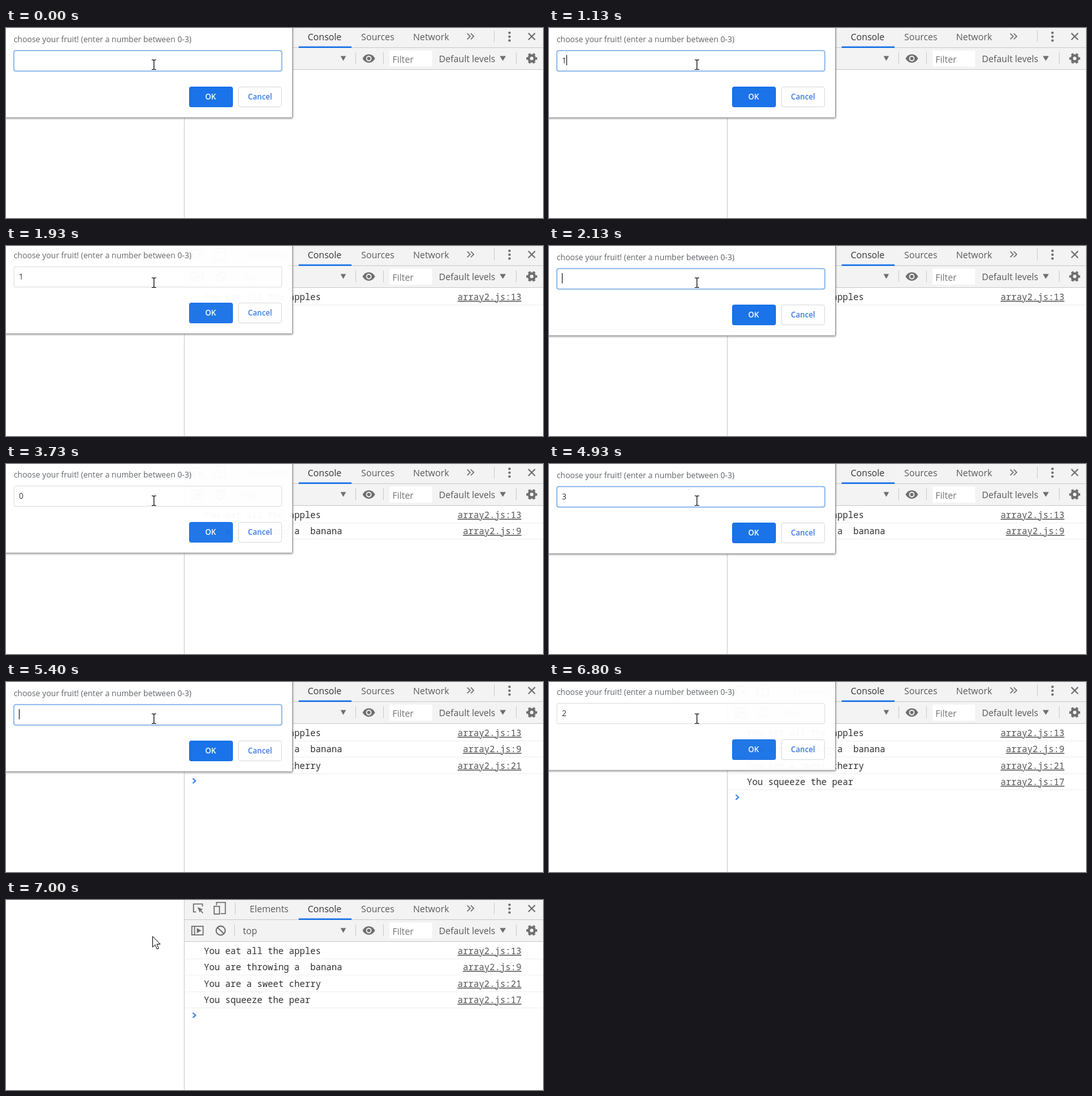
An HTML page for the animation above (8000 ms loop, 833x295 px).

```html
<!DOCTYPE html>
<html lang="en">
<head>
<meta charset="utf-8">
<title>Fruit prompt</title>
<style>
html, body { margin: 0; width: 100%; height: 100%; overflow: hidden; background: #fff; }
svg { display: block; }
text { font-family: "Open Sans", "Noto Sans", sans-serif; white-space: pre; }
.ui { font-size: 14px; fill: #5a5a5a; }
.log, .link { font-family: "Noto Sans Mono", "DejaVu Sans Mono", monospace; font-size: 13.75px; fill: #303030; }
.link { fill: #545454; text-anchor: end; text-decoration: underline; }
.msg { font-size: 12.3px; fill: #5f6368; }
.btn { font-size: 11.7px; font-weight: 600; text-anchor: middle; }
.icon { fill: none; stroke: #6e6e6e; stroke-width: 1.6; }
.solid { fill: #6e6e6e; }
</style>
</head>
<body>
<svg width="833" height="295" viewBox="0 0 833 295">
  <defs>
    <filter id="shade" x="-5%" y="-5%" width="110%" height="115%">
      <feDropShadow dx="0" dy="1" stdDeviation="1.5" flood-color="#000" flood-opacity=".4"/>
    </filter>
  </defs>
  <rect width="833" height="295" fill="#fff"/>

  <!-- developer tools -->
  <rect x="277" width="556" height="64" fill="#f3f3f3"/>
  <path d="M277 30.5H833M277 64.5H833M276.5 0V295" stroke="#ccc"/>
  <path d="M355.5 4V22M757.5 4V22M354.5 38V56M542.5 38V56M585.5 38V56M791.5 38V56" stroke="#ccc"/>
  <rect x="454" y="28.5" width="82" height="2.5" fill="#1a73e8"/>
  <text class="ui" x="378" y="18.5">Elements</text>
  <text class="ui" x="468" y="18.5" style="fill:#333">Console</text>
  <text class="ui" x="551" y="18.5">Sources</text>
  <text class="ui" x="631.5" y="18.5">Network</text>

  <g class="icon">
    <path d="M295 18.5H290.8V6.3H304.7V10"/>
    <path d="M297 11L305.5 14.5L302 16L300.5 19.5Z" class="solid" stroke="none"/>
    <path d="M301.5 16L305.5 20.5"/>
    <path d="M326.5 8V3.8H340.3V21.3H333"/>
    <rect x="322.8" y="9.8" width="8.4" height="12"/>
    <path d="M715.5 8.5L720 13L715.5 17.5M721 8.5L725.5 13L721 17.5"/>
    <path d="M810.3 8L820.7 18.4M820.7 8L810.3 18.4" stroke-width="1.9"/>
    <rect x="288.3" y="40.8" width="17.4" height="13.4"/>
    <path d="M292.5 41V54"/>
    <path d="M296 43.5L303 47.5L296 51.5Z" class="solid" stroke="none"/>
    <circle cx="333" cy="47.5" r="7" stroke-width="1.8"/>
    <path d="M328 42.6L338 52.4" stroke-width="1.8"/>
  </g>
  <g class="solid">
    <circle cx="781" cy="7.4" r="1.9"/><circle cx="781" cy="13.4" r="1.9"/><circle cx="781" cy="19.4" r="1.9"/>
    <path d="M519 43.5H527.4L523.2 51ZM766 43.5H775.4L770.7 51Z"/>
    <path d="M553 47.3Q556.5 40.7 562.8 40.7T572.6 47.3Q569 53.9 562.8 53.9T553 47.3Z"/>
  </g>
  <circle cx="562.8" cy="47.3" r="3.5" fill="#6e6e6e" stroke="#f3f3f3" stroke-width="1.7"/>
  <circle cx="815.5" cy="47.3" r="4.6" fill="none" stroke="#6e6e6e" stroke-width="3.8"/>
  <circle cx="815.5" cy="47.3" r="7.2" fill="none" stroke="#6e6e6e" stroke-width="2.6" pathLength="12" stroke-dasharray="1" stroke-dashoffset=".5"/>
  <text class="ui" x="367.5" y="52.5">top</text>
  <rect x="595" y="35" width="66" height="25" fill="#fff"/>
  <text class="ui" x="599.5" y="53.5" style="fill:#757575">Filter</text>
  <text class="ui" x="671.5" y="52.5">Default levels</text>

  <g id="rows"></g>
  <path id="chevron" d="M289.7 -3.8L294 0L289.7 3.8" fill="none" stroke="#3b7de9" stroke-width="1.9"/>

  <!-- prompt window -->
  <g id="dialog">
    <rect x="-10" y="-40" width="454.5" height="179.2" rx="1" fill="#fff" stroke="#929292" filter="url(#shade)"/>
    <text class="msg" x="12" y="21.5">choose your fruit! (enter a number between 0-3)</text>
    <rect id="box" x="12.2" y="35.2" width="415.6" height="31.6" rx="3" fill="#fff"/>
    <text id="digit" class="msg" x="20" y="55" style="fill:#303134"></text>
    <rect id="caret" y="42" width="1" height="16" fill="#111"/>
    <rect x="284" y="91" width="68" height="32" rx="3.5" fill="#1a73e8"/>
    <text class="btn" x="317.4" y="111" fill="#fff">OK</text>
    <rect x="360.5" y="91.5" width="67" height="31" rx="3.5" fill="#fff" stroke="#dadce0"/>
    <text class="btn" x="394" y="111" fill="#3b78e0">Cancel</text>
  </g>

  <path id="beam" d="M226 49.5H228.5L229.5 50.5L230.5 49.5H233M229.5 50V64M226 64.5H228.5L229.5 63.5L230.5 64.5H233" fill="none" stroke="#111" stroke-width="1.2"/>
  <path id="arrow" d="M227.5 56.5V73.2L231.4 69.5L234.2 76.2L236.9 75.1L234.1 68.5H239.2Z" fill="#fff" stroke="#111"/>
</svg>
<script>
const LOOP = 8000;
const $ = id => document.getElementById(id);

const logs = [
  ["You eat all the apples", 13],
  ["You are throwing a  banana", 9],
  ["You are a sweet cherry", 21],
  ["You squeeze the pear", 17]
];
// submit time and first lift of the closing window
const submits = [[1930, 3], [3730, 1], [5200, 2], [6800, 2]];
// time, caret shown, typed value
const keys = [
  [0, 0, ""], [330, 1, ""], [870, 0, ""], [1130, 1, "1"], [1670, 0, "1"],
  [2060, 0, ""], [2130, 1, ""], [2470, 0, ""], [2870, 1, "0"], [3400, 0, "0"],
  [3860, 0, ""], [3930, 1, ""], [4270, 0, ""], [4470, 1, "3"], [4930, 0, "3"],
  [5330, 0, ""], [5400, 1, ""], [5730, 0, ""], [6070, 1, "2"], [6600, 0, "2"]
];

$("rows").innerHTML = logs.map(([msg, line], i) => {
  const y = Math.round(84 + i * 25.4);
  return `<g><text class="log" x="307" y="${y}">${msg}</text>` +
    `<text class="link" x="799.5" y="${y}">array2.js:${line}</text>` +
    `<path d="M278 ${y + 7.5}H833" stroke="#f0f0f0"/></g>`;
}).join("");
const rows = [...$("rows").children];

const show = (el, on) => el.setAttribute("visibility", on ? "visible" : "hidden");

// lift and opacity of the window while it closes and reopens
function pose(t, count) {
  if (!count) return [0, 1, true];
  const [start, lift] = submits[count - 1];
  const age = t - start, last = count === submits.length;
  if (age < 70) return [lift, 0.97, false];
  if (age < 130) return [12, 0.4, false];
  if (age < 200) return last ? [17, 0.1, false] : [3, 0.8, true];
  return last ? [0, 0, false] : [0, 1, true];
}

function draw(t) {
  const count = submits.filter(s => t >= s[0]).length;
  const [lift, alpha, focus] = pose(t, count);
  const [, caret, value] = keys.filter(k => t >= k[0]).pop();

  rows.forEach((row, i) => show(row, i < count));
  $("chevron").setAttribute("transform", `translate(0 ${77.3 + count * 25.4})`);

  $("dialog").setAttribute("transform", `translate(0 ${-lift})`);
  $("dialog").setAttribute("opacity", alpha);
  $("box").setAttribute("stroke", focus ? "#8fb8ea" : "#dadce0");
  $("box").setAttribute("stroke-width", focus ? 1.8 : 1);
  $("digit").textContent = value;
  $("caret").setAttribute("x", value ? 27 : 20);
  $("caret").setAttribute("opacity", caret);

  const done = t >= 6930;
  show($("beam"), !done);
  show($("arrow"), done);
}

const begin = performance.now();
function tick() {
  draw((performance.now() - begin) % LOOP);
  requestAnimationFrame(tick);
}
tick();
</script>
</body>
</html>
```
